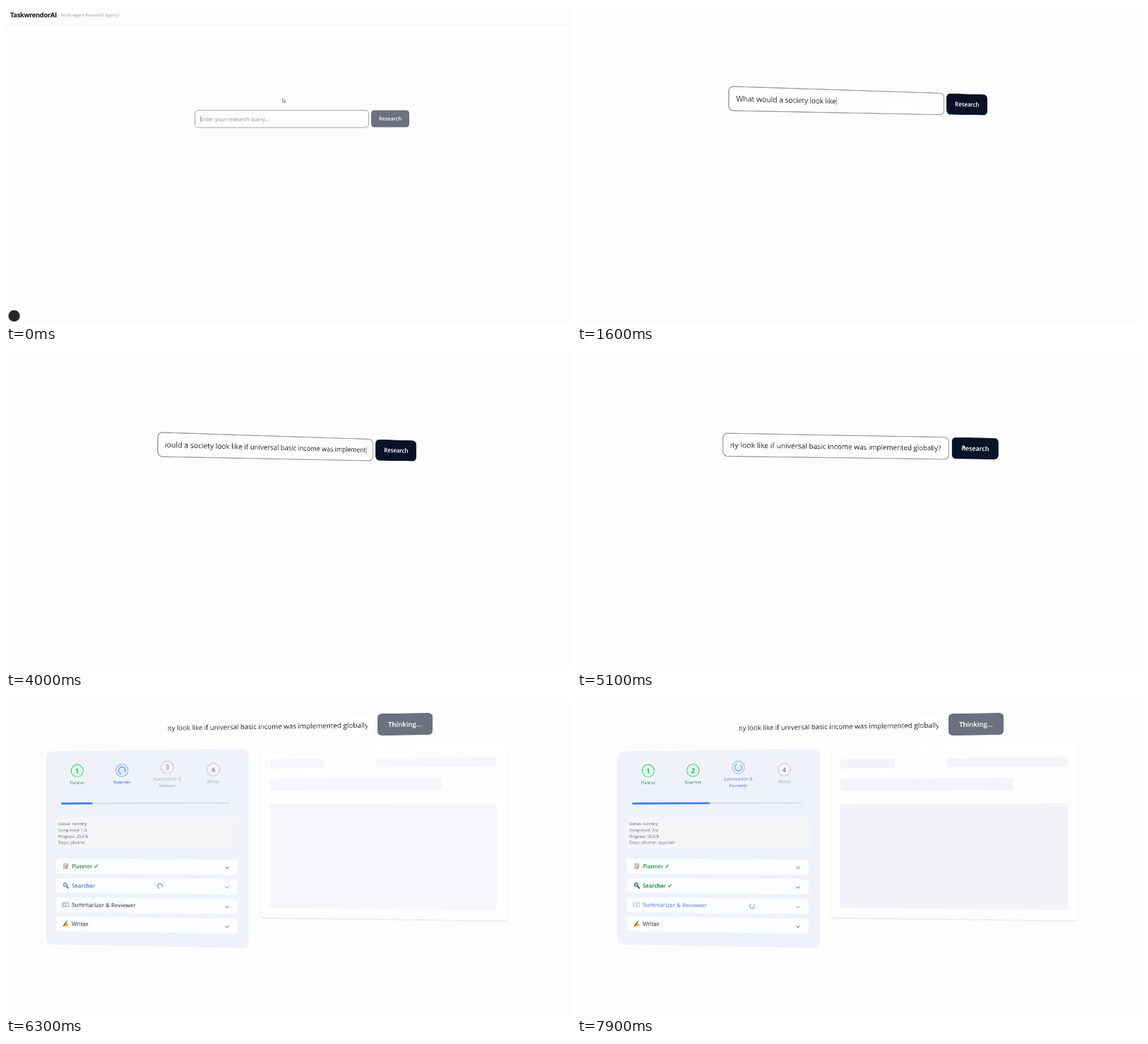
Write an HTML page that moves like this. It is 800x450 px and loops after 8 s.

```html
<!DOCTYPE html>
<html lang="en">
<head>
<meta charset="utf-8">
<title>Research agency demo</title>
<style>
  html, body { margin: 0; width: 100%; height: 100%; overflow: hidden; background: #fdfdfd; }
  main { position: relative; width: 100%; height: 100%; overflow: clip; contain: strict; }
  svg { position: absolute; left: 0; top: 0; overflow: visible; transform-origin: 0 0; }
  text { font-family: "Open Sans", "Noto Sans", sans-serif; text-rendering: geometricPrecision; white-space: pre; }
  .card { filter: drop-shadow(0 1.5px .8px rgba(0, 0, 0, .12)); }
</style>
</head>
<body>
<main>
<svg id="page" width="1600" height="900" viewBox="0 0 800 450"></svg>
<svg id="pointer" width="10" height="10"><path d="M.5 .5V6.2L2 5 3.2 7.2 4.2 6.6 3.1 4.6 5 4.4Z" fill="#fff" stroke="#666" stroke-width=".7"/></svg>
</main>
<script>
const LOOP = 8000, STEP = 100, SUBMIT = 5400, SWITCHES = [5800, 7200];
const QUERY = 'What would a society look like if universal basic income was implemented globally?';
const AGENTS = ['Planner', 'Searcher', 'Summarizer & Reviewer', 'Writer'];
const FONT_SIZE = 7.73;
const GREEN = '#1b8541', BLUE = '#2453c0';

// Camera keys: time, easing power, then centre x, centre y, x scale, y scale, perspective, slope
const CAMERA = [
  [100, 1, 419, 159.5, 1, 1, 0, 0],
  [1000, 3, 411, 135.6, 1.2, 1.297, -.000483, .0314],
  [4600, 1, 411, 135.6, 1.2, 1.297, -.000483, .0314],
  [5100, 1, 407.3, 134, 1.284, 1.29, -.0002, .02],
  [5400, 1, 408, 129, 1.278, 1.28, -.00005, 0],
  [6000, 4, 408, 39.4, 1.266, 1.266, .000125, -.0184],
];
// Pointer keys: time, easing power, x, y
const POINTER = [
  [4600, 1, 455, 190],
  [5000, 2, 546, 131],
  [5250, 1, 546, 131],
  [5700, 2, 676, 69],
];

const page = document.getElementById('page');
const pointer = document.getElementById('pointer');
const measure = document.createElement('canvas').getContext('2d');

const clamp = (v, lo, hi) => Math.min(hi, Math.max(lo, v));

function tween(keys, t) {
  const i = keys.findIndex(key => key[0] > t);
  if (i === 0) return keys[0].slice(2);
  if (i < 0) return keys[keys.length - 1].slice(2);
  const from = keys[i - 1], to = keys[i];
  const p = 1 - (1 - (t - from[0]) / (to[0] - from[0])) ** to[1];
  return to.slice(2).map((v, j) => from[j + 2] + (v - from[j + 2]) * p);
}

const pulse = age => .75 + .25 * Math.cos(Math.PI * age / 1000);

const rect = (x, y, w, h, r, fill, more = '') =>
  `<rect x="${x}" y="${y}" width="${w}" height="${h}" rx="${r}" fill="${fill}" ${more}/>`;

const circle = (x, y, r, fill, stroke = 'none', width = 1) =>
  `<circle cx="${x}" cy="${y}" r="${r}" fill="${fill}" stroke="${stroke}" stroke-width="${width}"/>`;

const line = (d, stroke, width = 1) =>
  `<path d="${d}" fill="none" stroke="${stroke}" stroke-width="${width}" stroke-linecap="round"/>`;

// Text centred vertically on y
const label = (str, x, y, size, fill, weight = 400, anchor = 'start', more = '') =>
  `<text x="${x}" y="${y + size * .36}" font-size="${size}" fill="${fill}" font-weight="${weight}" text-anchor="${anchor}" ${more}>${str.replace('&', '&amp;')}</text>`;

const spinner = (x, y, r, t) =>
  `<g transform="translate(${x} ${y}) rotate(${t * .36})">${line(`M${r} 0A${r} ${r} 0 1 1 0 ${-r}`, '#2f6fe0', 1.2)}</g>`;

function header() {
  return label('TaskwrendorAI', 6, 12.6, 9.3, '#111', 700, 'start', 'letter-spacing="-.3"')
    + label('Multi-Agent Research Agency', 78, 12.6, 6.1, '#999')
    + rect(0, 26, 800, .8, 0, '#f0f0f0')
    + circle(11.5, 438.5, 8.3, '#26262a', '#c8c8ca', .6);
}

function typedCount(t) {
  const n = t < 1600 ? (t - 200) * 30 / 1400 : 30 + (t - 1600) / 60;
  return clamp(Math.floor(n + 1e-6), 0, QUERY.length);
}

function form(t) {
  const busy = t >= SUBMIT;
  const typed = QUERY.slice(0, typedCount(t));
  const fieldWidth = busy ? 241 : 247;
  measure.font = `${FONT_SIZE * 10}px "Open Sans", "Noto Sans", sans-serif`;
  const length = measure.measureText(typed).width / 10;
  const x = 275 - Math.max(0, length + 1 - 231);
  const buttonX = 270 + fieldWidth;
  const content = typed
    ? label(typed, x, 159.8, FONT_SIZE, '#252525')
    : label('Enter your research query...', 275, 159.8, 7.6, '#8b8b8f');
  const caret = t < 4800 ? rect(x + length + .2, 155.2, .5, 9.2, 0, '#777') : '';
  return `<clipPath id="inner"><rect x="275" y="148" width="${fieldWidth - 16}" height="23"/></clipPath>`
    + rect(267.5, 147.5, fieldWidth - 1, 24.5, 5, '#fefefe', `stroke="${busy ? '#fafafa' : '#a3a3a7'}"`)
    + `<g clip-path="url(#inner)">${content}${caret}</g>`
    + rect(buttonX, 147.5, 571 - buttonX, 24, 4.5, busy || !typed ? '#6d707e' : '#0b1228')
    + label(busy ? 'Thinking...' : 'Research', (buttonX + 571) / 2, 159.6, 7.3, '#fff', 600, 'middle');
}

const ICONS = [
  rect(-3.5, -4, 6, 8, .8, '#d9d5d6', 'stroke="#a8a0a2" stroke-width=".6"')
    + line('M-2 -1.5H1M-2 .5H1', '#99999f', .6) + line('M3.5 -1.5L.5 2.6', '#c9705c', 1.3),
  line('M1 1L4 4', '#333', 1.7) + circle(-1, -1, 2.8, '#8ec5ee', '#39506b', 1),
  `<path d="M-4.5 -2.5Q-2 -3.5 0 -2Q2 -3.5 4.5 -2.5V3Q2 2 0 3.3Q-2 2 -4.5 3Z" fill="#e8eef5" stroke="#6290bd" stroke-width=".8"/>`
    + line('M0 -2V3', '#7f8b99', .7),
  `<path d="M-4 3.5L-2.5 -1L0 -2.5L4 .5L2.5 3.5Z" fill="#f2b233"/>` + line('M-3.5 3L2 -4', '#47413c', 1),
];

function stepBadge(i, stage, age, t) {
  const x = 91.2 + 67 * i, y = i === 2 ? 96.4 : 100.2;
  const state = i < stage ? 0 : i === stage ? 1 : 2;
  const [fill, stroke, ink] = [
    ['#dcfce7', '#48c774', GREEN], ['#dbeafe', '#5a96ee', BLUE], ['#f3f4f7', '#c3c5ca', '#83858b'],
  ][state];
  const mark = state === 1 ? spinner(x, y, 5, t) : label(String(i + 1), x, y, 9.3, ink, 600, 'middle');
  const lines = i === 2 ? ['Summarizer &', 'Reviewer'] : [AGENTS[i]];
  const names = lines.map((s, n) =>
    label(s, x, (i === 2 ? 112.8 : 117.5) + 9.5 * n, 6.1, state === 2 ? '#a0a2a8' : ink, state === 1 ? 600 : 400, 'middle'));
  return `<g opacity="${state === 1 ? pulse(age) : 1}">${circle(x, y, 9, fill, stroke)}${mark}${names.join('')}</g>`;
}

function agentRow(i, stage, age, t) {
  const y = 239.6 + 28.1 * i, active = i === stage, done = i < stage;
  const ink = done ? GREEN : active ? BLUE : '#585a60';
  return rect(59, y - 10.7, 268.5, 21.4, 4, '#fcfdfe')
    + `<g opacity="${active ? pulse(age) : 1}"><g transform="translate(74 ${y})">${ICONS[i]}</g>`
    + label(AGENTS[i] + (done ? ' ✓' : ''), 82.9, y, 8.3, ink, 600)
    + (active ? spinner([212, 214.5, 245.5][i], y, 3.5, t) : '')
    + line(`M309.8 ${y - .2}l2.3 2.3l2.3 -2.3`, '#777', .9) + '</g>';
}

function progressPanel(t) {
  const stage = SWITCHES.filter(s => t >= s).length;
  const age = t - (stage ? SWITCHES[stage - 1] : SUBMIT);
  const bar = stage ? (stage - Math.exp(-age / 350)) / 4 : 0;
  const steps = ['planner', 'searcher'].slice(0, stage).join(', ');
  const status = ['Status: running', `Completed: ${stage}/4`, `Progress: ${(stage * 25).toFixed(1)}%`, `Steps: ${steps}`];
  return rect(45, 72, 297.6, 282, 8, '#eff3f9', 'stroke="#ebeff5" stroke-width=".8"')
    + AGENTS.map((_, i) => stepBadge(i, stage, age, t)).join('')
    + rect(67, 146.6, 250, 2.6, 1.3, '#dde1e8')
    + rect(67, 146.6, 250 * bar, 2.6, 1.3, '#3b7de9')
    + rect(57.5, 168, 271, 45.5, 3, '#f4f5f7')
    + status.map((s, i) => label(s, 62, 177.8 + 9.1 * i, 6.2, '#6a6c71')).join('')
    + AGENTS.map((_, i) => agentRow(i, stage, age, t)).join('');
}

function reportPanel(t) {
  const block = (x, y, w, h) => rect(x, y, w, h, 3, '#eef1f7');
  return `<g class="card">${rect(360, 70, 341, 241, 5, '#fefefe')}</g>`
    + `<g opacity="${pulse(t - SUBMIT)}">`
    + block(373, 86, 77, 13.5) + block(522.7, 86, 163.5, 13)
    + block(373, 114, 240, 17) + block(373, 150, 314, 147) + '</g>';
}

function aim(t) {
  const [cx, cy, sx, sy, k, slope] = tween(CAMERA, t);
  const w = 1 + 419 * k;
  page.style.transform = `matrix3d(${[
    (sx - cx * k) / 2, (slope - cy * k) / 2, 0, -k / 2,
    0, sy / 2, 0, 0,
    0, 0, 1, 0,
    cx * w - 419 * sx, cy * w - 159.5 * sy - 419 * slope, 0, w,
  ].map(v => v.toFixed(9))})`;
}

function movePointer(t) {
  const [x, y] = t < 4600 ? [391, 130] : tween(POINTER, t);
  const shown = t < 300 || (t >= 4700 && t < 6000);
  pointer.style.display = shown ? 'block' : 'none';
  pointer.style.transform = `translate(${x}px, ${y}px)`;
}

function draw(t) {
  const panels = t < SUBMIT ? '' :
    `<g transform="translate(419 274.6) scale(${1 / 1.266}) translate(-408 -185)">${progressPanel(t)}${reportPanel(t)}</g>`;
  page.innerHTML = header() + form(t) + panels;
  aim(t);
  movePointer(t);
}

const start = performance.now();
let shownTime = -1;
function tick() {
  const t = Math.floor((performance.now() - start) % LOOP / STEP) * STEP;
  if (t !== shownTime) draw(shownTime = t);
  requestAnimationFrame(tick);
}
tick();
</script>
</body>
</html>
```
